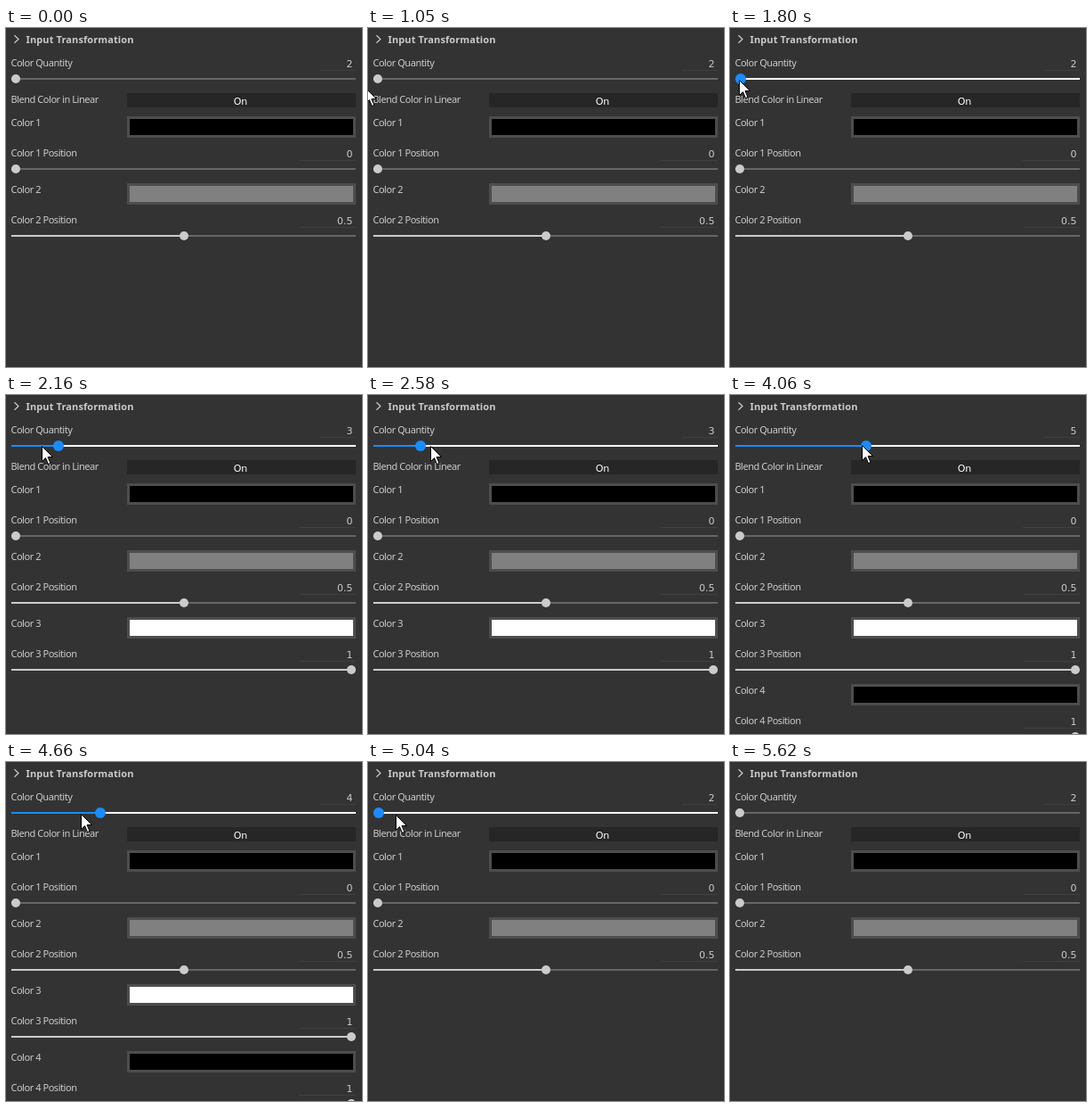
An HTML page with a canvas for the animation above (6.57 s loop, 400 by 380 pixels).

```html
<!DOCTYPE html>
<html lang="en">
<head>
<meta charset="utf-8">
<title>Color settings</title>
<style>
  html, body { margin: 0; overflow: hidden; background: #333; }
  canvas { display: block; }
</style>
</head>
<body>
<canvas id="stage" width="400" height="380"></canvas>
<script>
const ctx = document.getElementById('stage').getContext('2d');
const LOOP = 6570, ENTER = 900, PRESS = 1530, RELEASE = 5530, LEAVE = 5620;
const HOP = 86, STEP = 47, ROW = 75;
const LIGHT = '#cbcbcb', GRAY = '#666', BLUE = '#1a8cff';
const LABEL = '11px "Noto Sans", sans-serif';
const VALUE = '11px "DejaVu Sans", sans-serif';
const swatches = ['#000', '#808080', '#fff'];

// The pointer glides in, drags right, hops on, and drags back
const moves = [
  { from: ENTER, to: 1280, x: 10, y: 58 },
  { from: 1800, to: 3110, x: 123, y: 56 },
  { from: 3110, to: 3280, x: 148, y: 56 },
  { from: 4060, to: 5200, x: 10, y: 60 }
];

// Each move is walked in equal hops of about HOP ms
function pointerAt(t) {
  let x = -8, y = 70;
  for (const move of moves) {
    if (t < move.from) break;
    const hops = Math.round((move.to - move.from) / HOP);
    const done = Math.floor(hops * (t - move.from) / (move.to - move.from) + 0.01);
    const p = Math.min(1, done / hops);
    x += (move.x - x) * p;
    y += (move.y - y) * p;
  }
  return [Math.round(x), Math.round(y)];
}

function rect(x, y, w, h, color) {
  ctx.fillStyle = color;
  ctx.fillRect(x, y, w, h);
}

function text(str, x, y, { font = LABEL, color = LIGHT, align = 'left', spacing = 0 } = {}) {
  ctx.font = font;
  ctx.fillStyle = color;
  ctx.textAlign = align;
  ctx.letterSpacing = spacing + 'px';
  ctx.fillText(str, x, y);
}

const label = (str, y) => text(str, 5.4, y, { spacing: -0.45 });

function value(num, y, left) {
  rect(left, y + 3, 393 - left, 1, '#404040');
  text(String(num), 389.5, y, { font: VALUE, align: 'right' });
}

function slider(x, y, track, fill, handle = fill, radius = 5) {
  rect(6, y - 1, 387, 2, track);
  rect(6, y - 1, x - 6, 2, fill);
  ctx.fillStyle = handle;
  ctx.beginPath();
  ctx.arc(x, y, radius, 0, Math.PI * 2);
  ctx.fill();
}

function polyline(points, x, y) {
  ctx.beginPath();
  for (const [dx, dy] of points) ctx.lineTo(x + dx, y + dy);
}

function drawPointer(x, y) {
  polyline([[0, 0], [0, 17], [4, 13], [7, 20], [9.5, 19], [6.5, 12], [12, 12]], x + 0.5, y + 0.5);
  ctx.closePath();
  ctx.fillStyle = '#fff';
  ctx.strokeStyle = '#000';
  ctx.lineWidth = 1;
  ctx.fill();
  ctx.stroke();
}

function drawColor(i) {
  const top = 99 + ROW * i;
  const position = Math.min(1, i / 2);
  label(`Color ${i + 1}`, top + 11);
  rect(136, top, 257, 24, '#4d4d4d');
  rect(139, top + 3, 251, 18, swatches[i % swatches.length]);
  label(`Color ${i + 1} Position`, top + 45);
  value(position, top + 46, 329);
  slider(Math.round(11 + 377 * position), top + 59, GRAY, LIGHT);
}

function draw(t) {
  const [x, y] = pointerAt(t);
  const step = Math.max(0, Math.round((x - 12) / STEP));
  const quantity = step + 2;
  const pressed = t >= PRESS && t < RELEASE;
  const visible = t >= ENTER && t < LEAVE;
  const hovered = visible && Math.hypot(x - 11, y - 57) < 6;

  rect(0, 0, 400, 380, '#333');
  polyline([[0, 0], [4.5, 4.2], [0, 8.4]], 9.5, 8.3);
  ctx.strokeStyle = LIGHT;
  ctx.lineWidth = 1.2;
  ctx.stroke();
  text('Input Transformation', 22.6, 17, { font: 'bold ' + LABEL, spacing: 0.1 });

  label('Color Quantity', 43);
  value(quantity, 44, 353);
  if (pressed) slider(12 + STEP * step, 57, '#fff', BLUE, BLUE, 6);
  else slider(11, 57, GRAY, LIGHT, hovered ? '#fff' : LIGHT);

  label('Blend Color in Linear', 84);
  rect(136, 73, 257, 16, '#262626');
  text('On', 263.5, 86, { font: VALUE, color: '#fff', align: 'center' });

  for (let i = 0; i < quantity; i++) drawColor(i);
  if (visible) drawPointer(x, y);
}

const start = performance.now();
function tick() {
  draw((performance.now() - start) % LOOP);
  requestAnimationFrame(tick);
}
tick();
</script>
</body>
</html>
```
